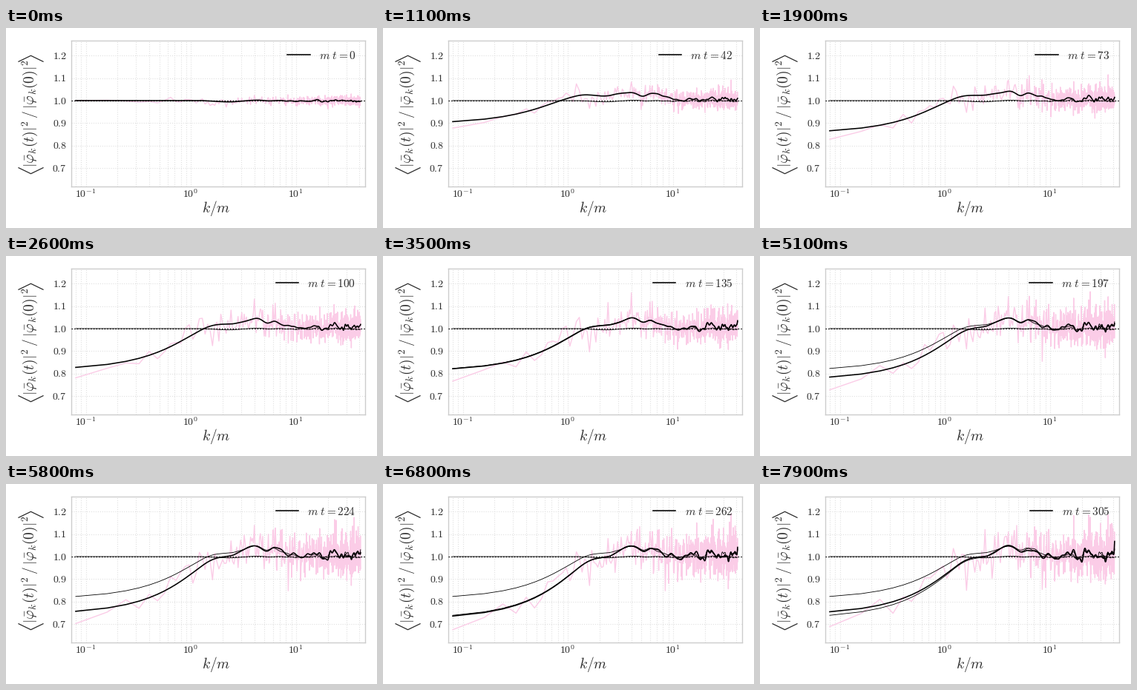
Recreate the animation shown at these times as a matplotlib script. Size 500 by 270 pixels, loop 8000 ms.

```python
import numpy as np
import matplotlib.pyplot as plt
from matplotlib.animation import FuncAnimation
from matplotlib.lines import Line2D

W, H, DPI = 500, 270, 100
FRAMES, STEP = 80, 3.857          # frames per loop, m*t per frame
MODES = 512
SNAPSHOTS = (0, 33, 65)           # frames whose mean curve stays as a thin line
INK, PINK = "0.17", "#fbcce7"

plt.rcParams["mathtext.fontset"] = "cm"

# Stage pixels: plot box, and where k = 1 and ratio = 1 fall
LEFT, RIGHT, TOP, BOTTOM = 88.3, 484.3, 17, 214
X0, DECADE = 249.4, 141.7
Y0, UNIT = 98, 303

n = np.arange(1, MODES + 1)
k = 0.08 * n

# Each mode drifts as a random walk; the very lowest ones hardly move
rng = np.random.default_rng(7)
steps = 0.0058 * rng.normal(size=(FRAMES, MODES))
steps[0] *= 2
walk = np.cumsum(steps, axis=0) * (1 - np.exp(-n / 3))

kernel = np.exp(-0.5 * (np.arange(-20, 21) / 6) ** 2)
kernel /= kernel.sum()
ripple = np.clip((np.log10(k) - 0.1) / 0.3, 0, 1)


def base(f):
    """Smooth spectrum: a deepening dip at low k and a plateau up to k = 7."""
    depth = np.interp(f, [0, 5, 11, 26, 43, 58, 67, 79],
                      [0, 0.075, 0.138, 0.225, 0.236, 0.298, 0.322, 0.3])
    q = k * (1.05 + 1.5 * np.exp(-f / 13))
    rise = 1 - np.exp(-f / 6)
    dip = depth * np.exp(-0.55 * q - 0.3 * q ** 2)
    low_end = 1 + 0.04 * rise - dip
    fall = 1 / (1 + (k / 7) ** -4)
    return low_end - (0.032 * rise) * fall


def mean_curve(f):
    smooth = np.convolve(np.pad(walk[f], 20, mode="edge"), kernel, mode="valid")
    return base(f) + ripple * smooth + 0.0008 * f * np.exp((n - MODES) / 6)


def raw_curve(f):
    sag = 0.05 * (1 - np.exp(-f / 10)) / n ** 2
    return base(f) * np.exp(walk[f]) - sag


fig = plt.figure(figsize=(W / DPI, H / DPI), dpi=DPI, facecolor="white")
ax = fig.add_axes([LEFT / W, 1 - BOTTOM / H, (RIGHT - LEFT) / W, (BOTTOM - TOP) / H])
ax.set_xscale("log")
ax.set_xlim(10 ** ((LEFT - X0) / DECADE), 10 ** ((RIGHT - X0) / DECADE))
ax.set_ylim(1 - (BOTTOM - Y0) / UNIT, 1 + (Y0 - TOP) / UNIT)
ax.set_yticks(np.arange(7, 13) / 10)
ax.tick_params(which="both", length=0, labelleft=False, labelbottom=False)
ax.grid(True, which="both", ls=":", lw=0.8, color="0.88")
ax.set_axisbelow(True)
for spine in ax.spines.values():
    spine.set(color="0.8", linewidth=1)


def label(x, y, text, size, ha="center", **kw):
    fig.text(x / W, 1 - y / H, text, size=size, ha=ha, va="baseline", color=INK, **kw)


def chevron(tip, arm):
    xs = np.array([17, 33.5, 50]) / W
    fig.add_artist(Line2D(xs, 1 - np.array([arm, tip, arm]) / H, color=INK, lw=0.9))


for v in range(7, 13):
    label(82, Y0 - UNIT * (v / 10 - 1) + 4.6, f"${v / 10:.1f}$", 10, ha="right")
for e in (-1, 0, 1):
    label(X0 + DECADE * e - 1, 229, f"$10^{{{e}}}$", 10)
label(283.7, 249.5, r"$k/m$", 14)
label(38.4, 115.2, r"$|\bar{\varphi}_k(t)|^2\,/\,|\bar{\varphi}_k(0)|^2$", 14,
      rotation=90, rotation_mode="anchor")
chevron(196.7, 188.7)
chevron(37.3, 45.3)


def clock_text(f):
    return rf"$m\,\,t={round(STEP * f)}$"


raw, = ax.plot(k, raw_curve(0), color=PINK, lw=1, zorder=2)
thin = [ax.plot(k, mean_curve(s), color="black", lw=0.6, zorder=3)[0] for s in SNAPSHOTS]
main, = ax.plot(k, mean_curve(0), color="black", lw=1.15, zorder=4, label=clock_text(0))
ax.axhline(1, color="black", ls=":", lw=1, zorder=5)
legend = ax.legend(loc="upper right", frameon=False, fontsize=11, labelcolor=INK,
                   borderaxespad=0.44)
clock = legend.get_texts()[0]


def update(f):
    raw.set_ydata(raw_curve(f))
    main.set_ydata(mean_curve(f))
    for line, s in zip(thin, SNAPSHOTS):
        line.set_visible(f > s)
    clock.set_text(clock_text(f))
    return [raw, main, clock, *thin]


anim = FuncAnimation(fig, update, frames=FRAMES, interval=100, repeat=True, blit=False)
plt.show()
```
